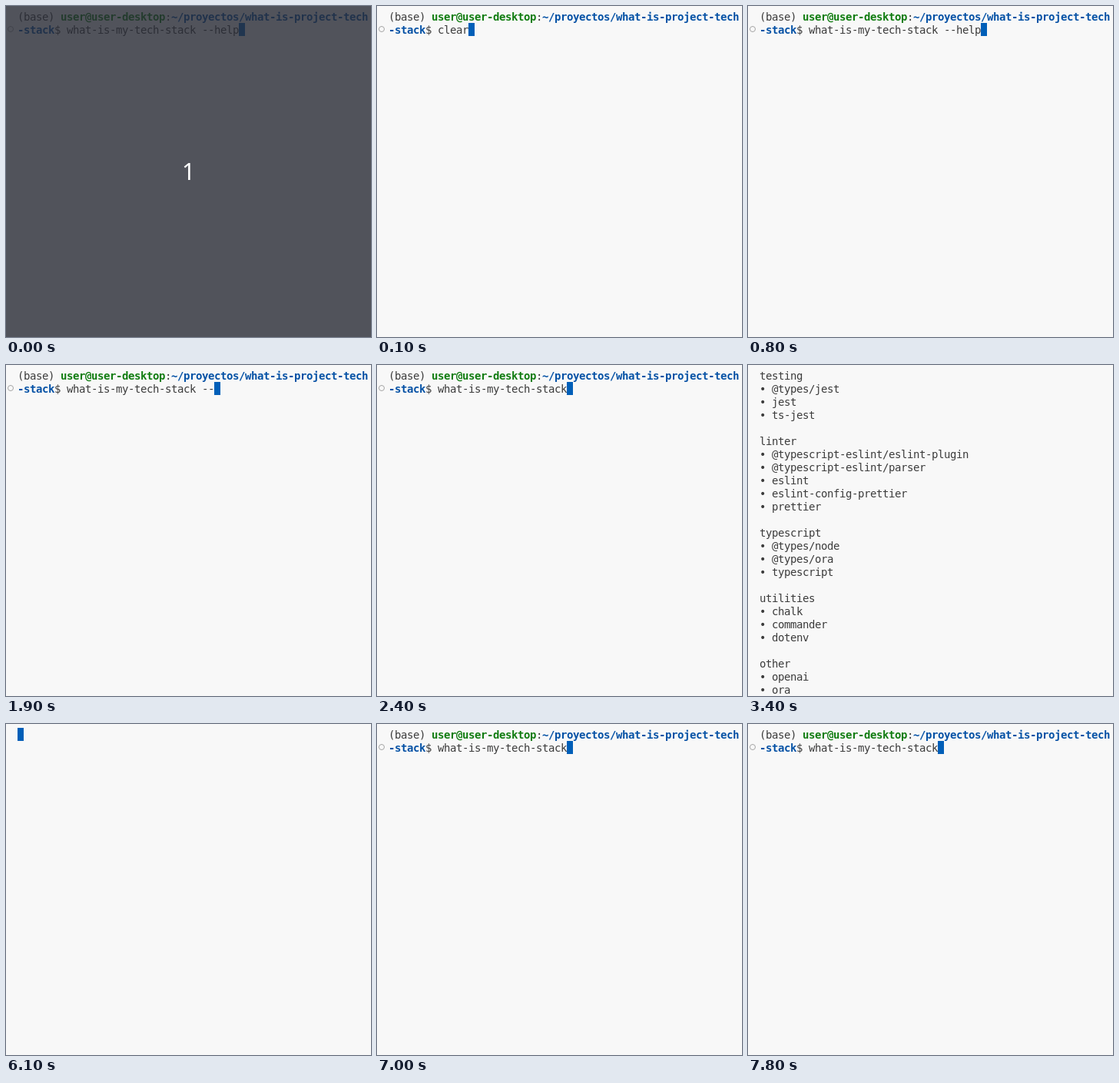
Write an HTML page that moves like this. It is 475x430 px and loops after 8 s.

```html
<!DOCTYPE html>
<html lang="en">
<head>
<meta charset="utf-8">
<title>Terminal session</title>
<style>
  html, body { margin: 0; width: 100%; height: 100%; overflow: hidden; }
  #stage { position: relative; width: 475px; height: 430px; overflow: hidden; background: #f8f8f8; }
  pre {
    position: absolute; left: 15px; top: 6px; margin: 0;
    font: 14px/17px "DejaVu Sans Mono", monospace;
    letter-spacing: calc(8px - 1ch);
    font-variant-ligatures: none;
    color: #3b3b3b;
  }
  b { font-weight: 700; }
  .user { color: #107c10; }
  .path { color: #0451a5; }
  #cursor { position: absolute; width: 8px; height: 17px; background: #005fb8; }
  #mark {
    position: absolute; left: 2px; top: 26px; width: 8px; height: 8px;
    box-sizing: border-box; border: 1px solid #a4a4a4; border-radius: 50%;
  }
  #countdown { position: absolute; inset: 0; background: rgba(40, 43, 53, .8); }
  #countdown text { font: 30px "Noto Sans", sans-serif; fill: #fff; text-anchor: middle; }
</style>
</head>
<body>
<div id="stage">
  <div id="mark"></div>
  <div id="cursor"></div>
  <pre id="prompt">(base) <b class="user">user@user-desktop</b>:<b class="path">~/proyectos/what-is-project-tech
-stack</b>$ <span id="command"></span></pre>
  <pre id="output"></pre>
  <svg id="countdown" width="475" height="430"><text x="237.5" y="226">1</text></svg>
</div>
<script>
const LOOP = 8000, CELL = 8, ROW = 17, LEFT = 15, TOP = 5;
const PROMPT_COLUMNS = 8;
const tool = 'what-is-my-tech-stack';
const help = tool + ' --help';

const groups = {
  testing: ['@types/jest', 'jest', 'ts-jest'],
  linter: ['@typescript-eslint/eslint-plugin', '@typescript-eslint/parser',
    'eslint', 'eslint-config-prettier', 'prettier'],
  typescript: ['@types/node', '@types/ora', 'typescript'],
  utilities: ['chalk', 'commander', 'dotenv'],
  other: ['openai', 'ora'],
};
const listing = Object.entries(groups)
  .map(([title, items]) => [title, ...items.map(item => '• ' + item)].join('\n'))
  .join('\n\n');

const typing = command => ({ command, cursor: [PROMPT_COLUMNS + command.length, 1] });
const erase = count => typing(help.slice(0, help.length - count));

const timeline = [
  [0, { ...typing(help), countdown: true }],
  [100, typing('clear')],
  [800, typing(help)],
  [1500, erase(1)],
  ...[2, 3, 4, 5, 6].map((count, i) => [1700 + i * 100, erase(count)]),
  [2400, typing(tool)],
  [3200, { command: tool, cursor: [0, 2] }],
  [3300, { command: tool }],
  [3400, { output: listing }],
  [6100, { cursor: [0, 0] }],
  [6200, typing('')],
  [6700, typing('clear')],
  [7000, typing(tool)],
  [7300, typing('clear')],
  [7800, typing(tool)],
];

const el = id => document.getElementById(id);
const show = (id, on) => { el(id).style.display = on ? '' : 'none'; };

function render({ command, cursor, output = '', countdown }) {
  show('prompt', command !== undefined);
  show('mark', command !== undefined);
  show('cursor', cursor);
  show('countdown', countdown);
  el('command').textContent = command ?? '';
  el('output').textContent = output;
  if (cursor) {
    el('cursor').style.left = LEFT + cursor[0] * CELL + 'px';
    el('cursor').style.top = TOP + cursor[1] * ROW + 'px';
  }
}

let shown;
const start = performance.now();
function tick() {
  const time = (performance.now() - start) % LOOP;
  const [, state] = timeline.findLast(([from]) => from <= time);
  if (state !== shown) render(shown = state);
  requestAnimationFrame(tick);
}
tick();
</script>
</body>
</html>
```
